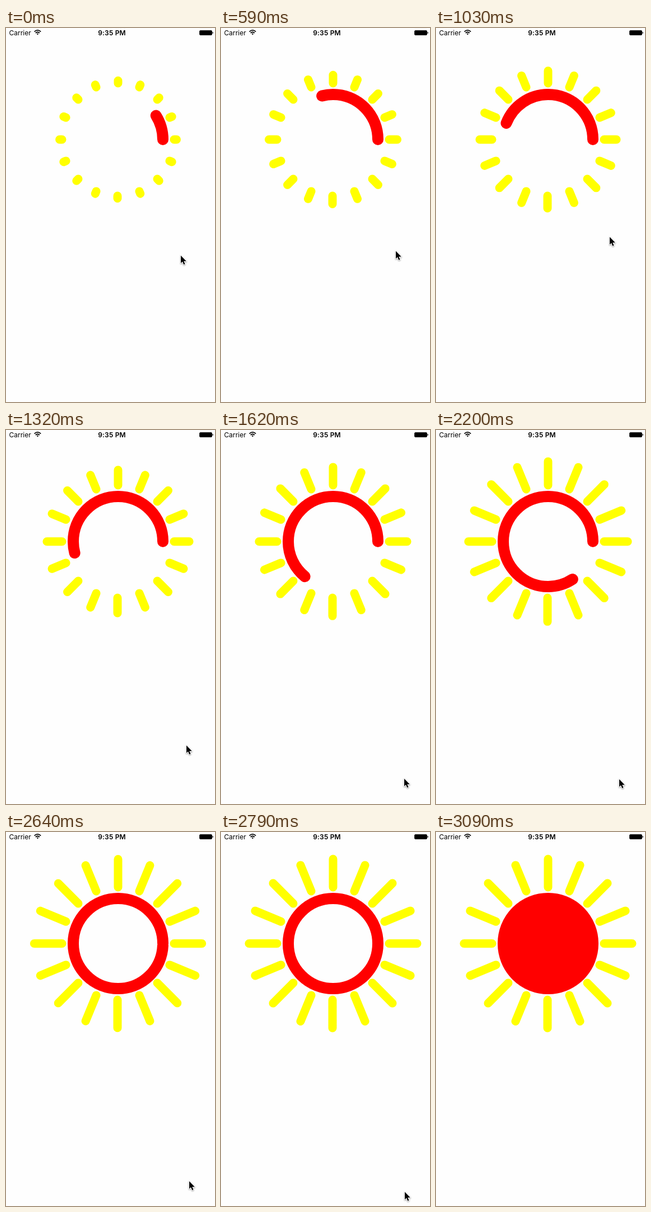
These frames come from a looping animation (373x664 px, 3.98 s). An HTML page:

```html
<!DOCTYPE html>
<html lang="en">
<head>
<meta charset="utf-8">
<title>Sun progress</title>
<style>
  html, body { margin: 0; width: 100%; height: 100%; overflow: hidden; background: #fefefe; }
  svg { display: block; width: 373px; height: 664px; }
  text { font: 12px Inter, "Liberation Sans", sans-serif; }
  .time { font-weight: 600; letter-spacing: .2px; text-anchor: middle; }
  .rays { fill: none; stroke: #ff0; stroke-width: 15; stroke-linecap: round; }
  .ring { fill: none; stroke: #f00; stroke-width: 20; stroke-linecap: round; }
  .cursor { filter: drop-shadow(0 1px 1px rgba(0, 0, 0, .4)); }
  .cursor path { stroke: #fff; stroke-width: 2; paint-order: stroke; stroke-linejoin: round; }
</style>
</head>
<body>
<svg viewBox="0 0 373 664">
  <text x="5.5" y="12.7">Carrier</text>
  <g fill="none" stroke="#000" stroke-width="1.7">
    <path d="M50.6 6.6Q56.4 1.2 62.2 6.6"/>
    <path d="M52.8 8.9Q56.4 5.6 60 8.9"/>
    <path d="M54.6 10.2Q56.4 8.6 58.2 10.2L56.4 12.2Z" fill="#000" stroke="none"/>
  </g>
  <text class="time" x="189" y="12.7">9:35 PM</text>
  <rect x="345.5" y="4.5" width="22" height="8" rx="1.5" stroke="#000" stroke-opacity=".8"/>
  <path d="M368.5 7Q370 7.3 370 8.5T368.5 10Z"/>

  <path class="rays"/>
  <path class="ring" pathLength="1" d="M280 198A80 80 0 0 0 120 198A80 80 0 0 0 280 198"/>
  <g class="cursor"><path d="M0 0V13.6L3 10.7 5.3 15.9 7.5 15 5.3 9.9H9.8Z"/></g>
</svg>
<script>
  const LOOP = 3980, STEP = 146.6, FILL_STEP = 20, HIDE_STEP = 21;
  const CX = 200, CY = 198, RAYS = 16, INNER = 100, OUTER = 150;
  // Pointer path: [step, x, y]
  const path = [[0, 312, 404], [5, 312, 394], [7, 310, 371], [8, 310, 369],
    [9, 322, 560], [11, 327, 619], [18, 327, 620], [20, 329, 658]];

  const find = name => document.querySelector(name);
  const rays = find('.rays'), ring = find('.ring'), cursor = find('.cursor');
  const mix = (a, b, k) => a + (b - a) * k;

  // Ray ends sit on whole pixels; the small term keeps the level rays level.
  const rayEnd = (angle, r) => [
    Math.floor(CX + r * Math.cos(angle)),
    Math.floor(CY - r * Math.sin(angle) + 1e-9)
  ];

  function rayPath(p) {
    let d = '';
    for (let i = 0; i < RAYS; i++) {
      const angle = i * 2 * Math.PI / RAYS;
      const [x1, y1] = rayEnd(angle, INNER), [x2, y2] = rayEnd(angle, OUTER);
      d += `M${x1} ${y1}L${mix(x1, x2, p)} ${mix(y1, y2, p)}`;
    }
    return d;
  }

  function pointerAt(step) {
    const next = path.findIndex(key => key[0] > step);
    if (next < 0) return path[path.length - 1].slice(1);
    const [s1, x1, y1] = path[next - 1], [s2, x2, y2] = path[next];
    const k = (step - s1) / (s2 - s1);
    return [Math.round(mix(x1, x2, k)), Math.round(mix(y1, y2, k))];
  }

  function show(step) {
    const p = Math.min(1, 0.0893 + 0.0502 * step);
    rays.setAttribute('d', rayPath(p));
    ring.style.strokeDasharray = p < 1 ? `${p} 2` : 'none';
    ring.style.fill = step >= FILL_STEP ? '#f00' : 'none';
    cursor.setAttribute('transform', `translate(${pointerAt(step)})`);
    cursor.style.display = step >= HIDE_STEP ? 'none' : '';
  }

  const start = performance.now();
  function tick() {
    const t = (performance.now() - start) % LOOP;
    show(Math.min(HIDE_STEP, Math.floor(t / STEP)));
    requestAnimationFrame(tick);
  }
  tick();
</script>
</body>
</html>
```
